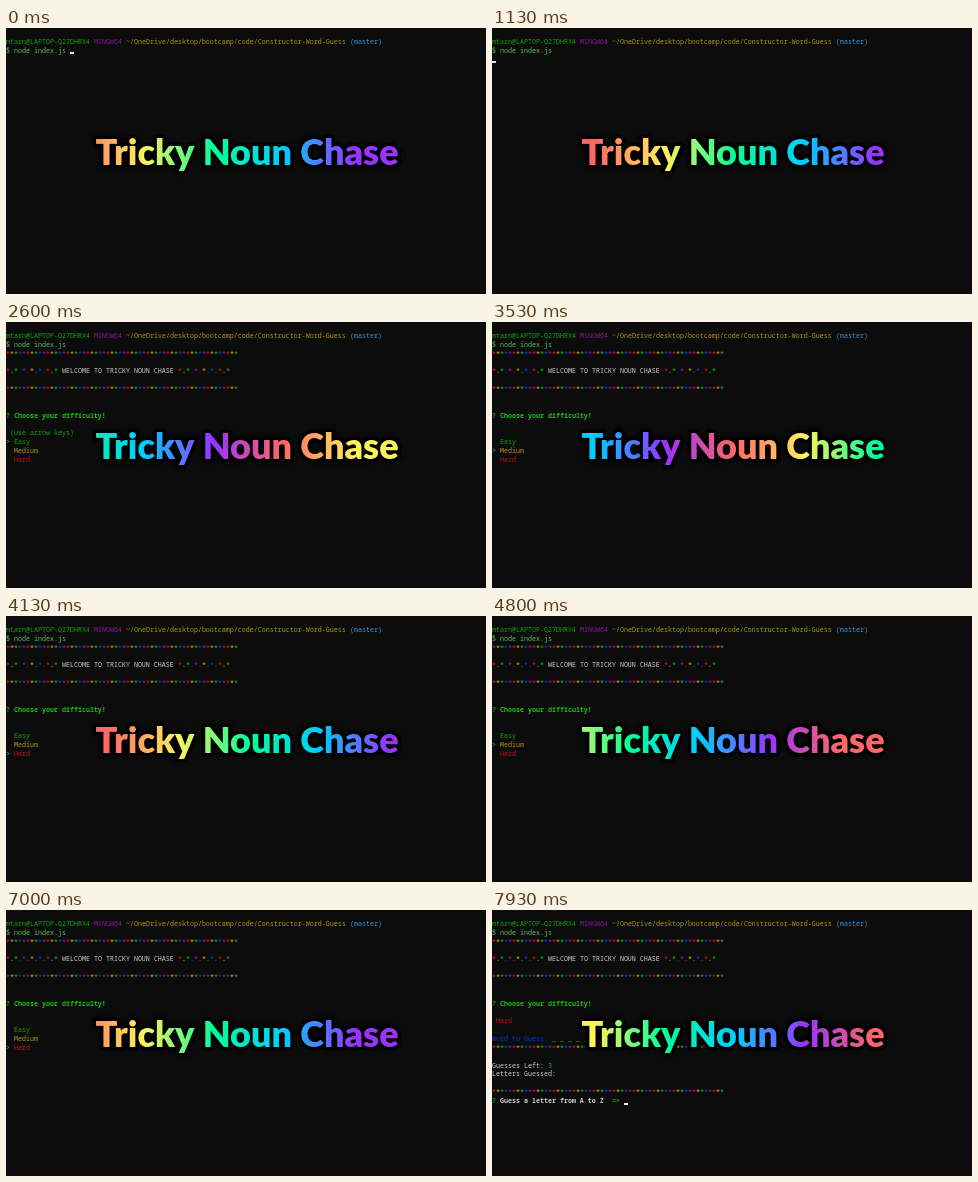
Animation of 480x266 px, one loop 8000 ms. Source, as an HTML page with a canvas:

```html
<!DOCTYPE html>
<html lang="en">
<head>
<meta charset="utf-8">
<title>Tricky Noun Chase</title>
<style>
  html, body { margin: 0; width: 100%; height: 100%; overflow: hidden; background: #0c0c0c; }
  canvas { display: block; width: 100%; height: 100%; }
</style>
</head>
<body>
<canvas id="stage" width="480" height="266"></canvas>
<script>
const ctx = document.getElementById('stage').getContext('2d');
const LOOP = 8000, STEP = 1000 / 15;
const COLUMN = 4, ROW = 8.85, FIRST_BASELINE = 16;

const RED = '#c50f1f', YELLOW = '#b09410', GREEN = '#13a10e', BLUE = '#0037da',
      MAGENTA = '#881798', CYAN = '#3a96dd', WHITE = '#cccccc', COMMAND = '#58c058',
      BRIGHT_GREEN = '#16c60c';
const RAINBOW = [RED, YELLOW, GREEN, BLUE, MAGENTA];
const TITLE_COLORS = ['#ff6666', '#fff35c', '#00ff99', '#00ccff', '#9933ff'];

const OPTIONS = [['Easy', GREEN], ['Medium', YELLOW], ['Hard', RED]];
const ENTER = 500, MENU = 1500, CHOSEN = 7330;
// [time, selected option]
const SELECTIONS = [[MENU, 0], [3000, 1], [3900, 2], [4500, 1], [5400, 0], [6400, 1], [6900, 2]];

function setTerminalFont(weight) {
  ctx.font = `${weight} 6.667px "Noto Sans Mono", monospace`;
}

// Writes [text, color] parts one after another on a row of the terminal.
function write(row, column, ...parts) {
  for (const [text, color] of parts) {
    ctx.fillStyle = color;
    ctx.fillText(text, column * COLUMN, FIRST_BASELINE + row * ROW);
    column += text.length;
  }
}

function writeBold(...args) {
  setTerminalFont(700);
  write(...args);
  setTerminalFont(500);
}

function writeRainbow(row, column, text) {
  writeBold(row, column, ...[...text].map((char, i) => [char, RAINBOW[i % RAINBOW.length]]));
}

function drawCursor(row, column) {
  ctx.fillStyle = '#e6e6e6';
  ctx.fillRect(column * COLUMN, Math.floor(FIRST_BASELINE + row * ROW), 4, 2);
}

const drawRule = row => writeRainbow(row, 0, '*'.repeat(58));

function drawMenu(time) {
  const [since, selected] = SELECTIONS.findLast(([start]) => time >= start);
  if (since === MENU) write(11, 1, ['(Use arrow keys)', GREEN]);
  OPTIONS.forEach((option, i) => write(12 + i, 2, option));
  write(12 + selected, 0, ['>', CYAN]);
}

function drawGame() {
  write(11, 1, OPTIONS[2]);
  write(13, 0, ['Word to Guess: ', BLUE], ['_ _ _ _ _ _', GREEN]);
  drawRule(14);
  write(16, 0, ['Guesses Left: ', WHITE], ['3', BRIGHT_GREEN]);
  write(17, 0, ['Letters Guessed:', WHITE]);
  drawRule(19);
  writeBold(20, 0, ['? ', GREEN], ['Guess a letter from A to Z  ', WHITE], ['=>', GREEN]);
  drawCursor(20, 33);
}

function drawTerminal(time) {
  setTerminalFont(500);
  ctx.textAlign = 'left';
  write(0, 0, ['mtarn@LAPTOP-Q27DHRX4 ', GREEN], ['MINGW64 ', MAGENTA],
    ['~/OneDrive/desktop/bootcamp/code/Constructor-Word-Guess ', YELLOW], ['(master)', CYAN]);
  write(1, 0, ['$ node index.js', COMMAND]);
  if (time < ENTER) return drawCursor(1, 16);
  if (time < MENU) return drawCursor(2, 0);

  drawRule(2);
  writeRainbow(4, 0, '*.*.*.*.*.*.*');
  write(4, 14, ['WELCOME TO TRICKY NOUN CHASE', WHITE]);
  writeRainbow(4, 43, '*.*.*.*.*.*.*');
  drawRule(6);
  writeBold(9, 0, ['? ', GREEN], ['Choose your difficulty!', BRIGHT_GREEN]);
  if (time < CHOSEN) drawMenu(time);
  else drawGame();
}

// The bands slide right for three steps, then the colors rotate; the ends stay flat.
function drawTitle(step) {
  const band = 70, count = TITLE_COLORS.length;
  const left = 68 + (step % 3) * band / 4;
  const first = count - Math.floor(step / 3) % count;
  const gradient = ctx.createLinearGradient(left, 0, left + band * (count - 1), 0);
  for (let i = 0; i < count; i++) {
    gradient.addColorStop(i / (count - 1), TITLE_COLORS[(first + i) % count]);
  }
  const title = ['Tricky Noun Chase', 241, 137];
  ctx.font = '900 36px Lato, sans-serif';
  ctx.textAlign = 'center';
  ctx.lineJoin = 'round';
  ctx.lineWidth = 6;
  ctx.strokeStyle = ctx.shadowColor = '#000';
  ctx.shadowBlur = 4;
  ctx.strokeText(...title);
  ctx.shadowBlur = 0;
  ctx.fillStyle = gradient;
  ctx.fillText(...title);
}

function draw() {
  const time = performance.now() % LOOP;
  ctx.fillStyle = '#0c0c0c';
  ctx.fillRect(0, 0, 480, 266);
  drawTerminal(time);
  drawTitle(Math.floor((time + 4) / STEP));
  requestAnimationFrame(draw);
}
draw();
</script>
</body>
</html>
```
